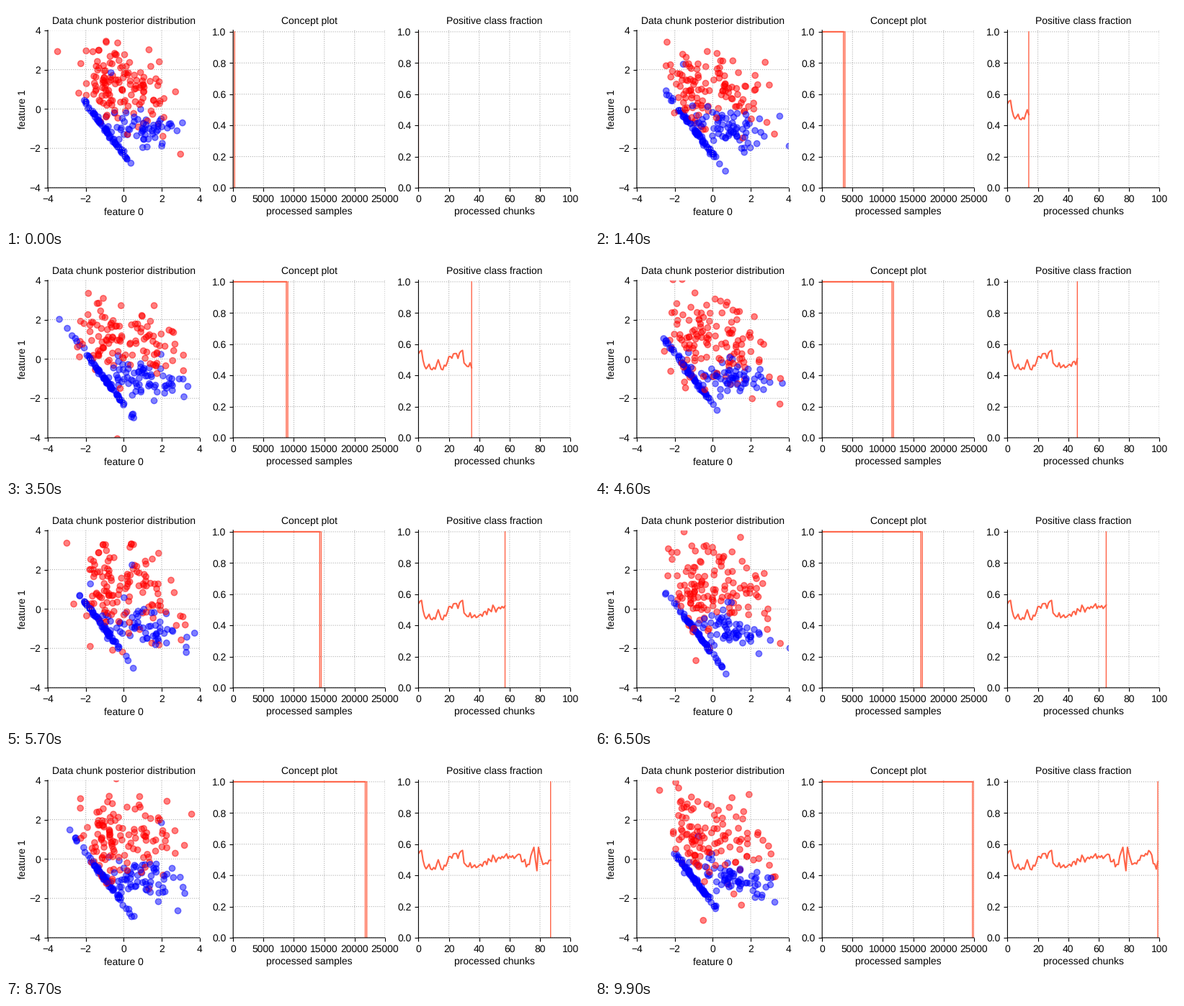
A matplotlib script that plays this animation: 809 px wide and 309 px high, repeating every 10000 ms.

```python
import numpy as np
import matplotlib.pyplot as plt
from matplotlib.animation import FuncAnimation

W, H, DPI = 809, 309, 100
CHUNKS, SIZE = 100, 250

plt.rcParams.update({
    "font.family": "Liberation Sans",
    "font.size": 10,
    "axes.titlesize": 10,
    "axes.titlepad": 6.4,
    "axes.spines.top": False,
    "axes.spines.right": False,
    "grid.linestyle": ":",
    "path.snap": False,
    "text.hinting": "no_hinting",
})

# Two clusters per class: center x, y, spread x, y, correlation
NEGATIVE = [(-1, -1, 0.70, 0.90, -0.997), (1, -1, 1.00, 0.50, -0.35)]
POSITIVE = [(-1, 1, 0.65, 1.10, -0.25), (1, 1, 1.10, 1.15, -0.45)]

# Main turning points of the positive share: chunk, share
TURNS = [(0, 0.54), (2, 0.56), (4, 0.46), (11, 0.44), (13, 0.50), (15, 0.44),
         (20, 0.52), (29, 0.56), (30, 0.48), (38, 0.45), (44, 0.49), (65, 0.53),
         (73, 0.47), (76, 0.58), (78, 0.43), (79, 0.58), (82, 0.47), (94, 0.55),
         (98, 0.44), (99, 0.49)]


def positive_share():
    """Turning points joined by lines, with sampling noise in between."""
    knots, values = zip(*TURNS)
    noise = np.random.default_rng(7).normal(0, 0.015, CHUNKS)
    noise[list(knots)] = 0
    return np.interp(np.arange(CHUNKS), knots, values) + noise


SHARE = positive_share()


def cluster(rng, n, cx, cy, sx, sy, r):
    u, v = rng.standard_normal((2, n))
    return np.column_stack([cx + sx * u, cy + sy * (r * u + np.sqrt(1 - r * r) * v)])


def chunk(i):
    """Points and labels of one data chunk, shuffled, with some label noise."""
    rng = np.random.default_rng(1000 + i)
    n_pos = round(SHARE[i] * SIZE)
    points, labels = [], []
    for label, n, shapes in ((0, SIZE - n_pos, NEGATIVE), (1, n_pos, POSITIVE)):
        for part, shape in zip((n // 2, n - n // 2), shapes):
            points.append(cluster(rng, part, *shape))
        labels.append(np.full(n, label))
    points, labels = np.vstack(points), np.concatenate(labels)
    flip = rng.random(SIZE) < 0.01
    labels = np.where(flip, 1 - labels, labels)
    order = rng.permutation(SIZE)
    return points[order], labels[order]


fig = plt.figure(figsize=(W / DPI, H / DPI), dpi=DPI, facecolor="white")


def panel(col, title, xlabel, xlim, ylim, xstep, ystep):
    left = 58 + 257.2 * col
    ax = fig.add_axes([left / W, 56 / H, 210.7 / W, 219.3 / H])
    ax.set(title=title, xlim=xlim, ylim=ylim,
           xticks=np.arange(xlim[0], xlim[1] + 1, xstep),
           yticks=np.arange(ylim[0], ylim[1] + 0.001, ystep))
    ax.set_xlabel(xlabel, labelpad=3.3)
    ax.grid(True)
    return ax


ax_data = panel(0, "Data chunk posterior distribution", "feature 0",
                (-4, 4), (-4, 4), 2, 2)
ax_data.set_ylabel("feature 1", labelpad=1.8)
ax_concept = panel(1, "Concept plot", "processed samples",
                   (0, CHUNKS * SIZE), (0, 1.01), 5000, 0.2)
ax_share = panel(2, "Positive class fraction", "processed chunks",
                 (0, CHUNKS), (0, 1.01), 20, 0.2)

xy, cls = chunk(0)
dots = ax_data.scatter(xy[:, 0], xy[:, 1], c=cls, cmap="bwr",
                       vmin=0, vmax=1, alpha=0.5)


def line(ax, width):
    return ax.plot([], [], color="tomato", lw=width)[0]


level = line(ax_concept, 1.5)
start_bar, end_bar = line(ax_concept, 1), line(ax_concept, 1)
curve, now_bar = line(ax_share, 1.5), line(ax_share, 1)


def update(i):
    points, labels = chunk(i)
    dots.set_offsets(points)
    dots.set_array(labels)
    start, end = i * SIZE, (i + 1) * SIZE
    level.set_data([0, start], [1, 1])
    for bar, x in ((start_bar, start), (end_bar, end), (now_bar, i)):
        bar.set_data([x, x], [0, 1])
    curve.set_data(np.arange(i + 1), SHARE[:i + 1])
    return dots, level, start_bar, end_bar, curve, now_bar


anim = FuncAnimation(fig, update, frames=CHUNKS, interval=100,
                     repeat=True, repeat_delay=0)
plt.show()
```
